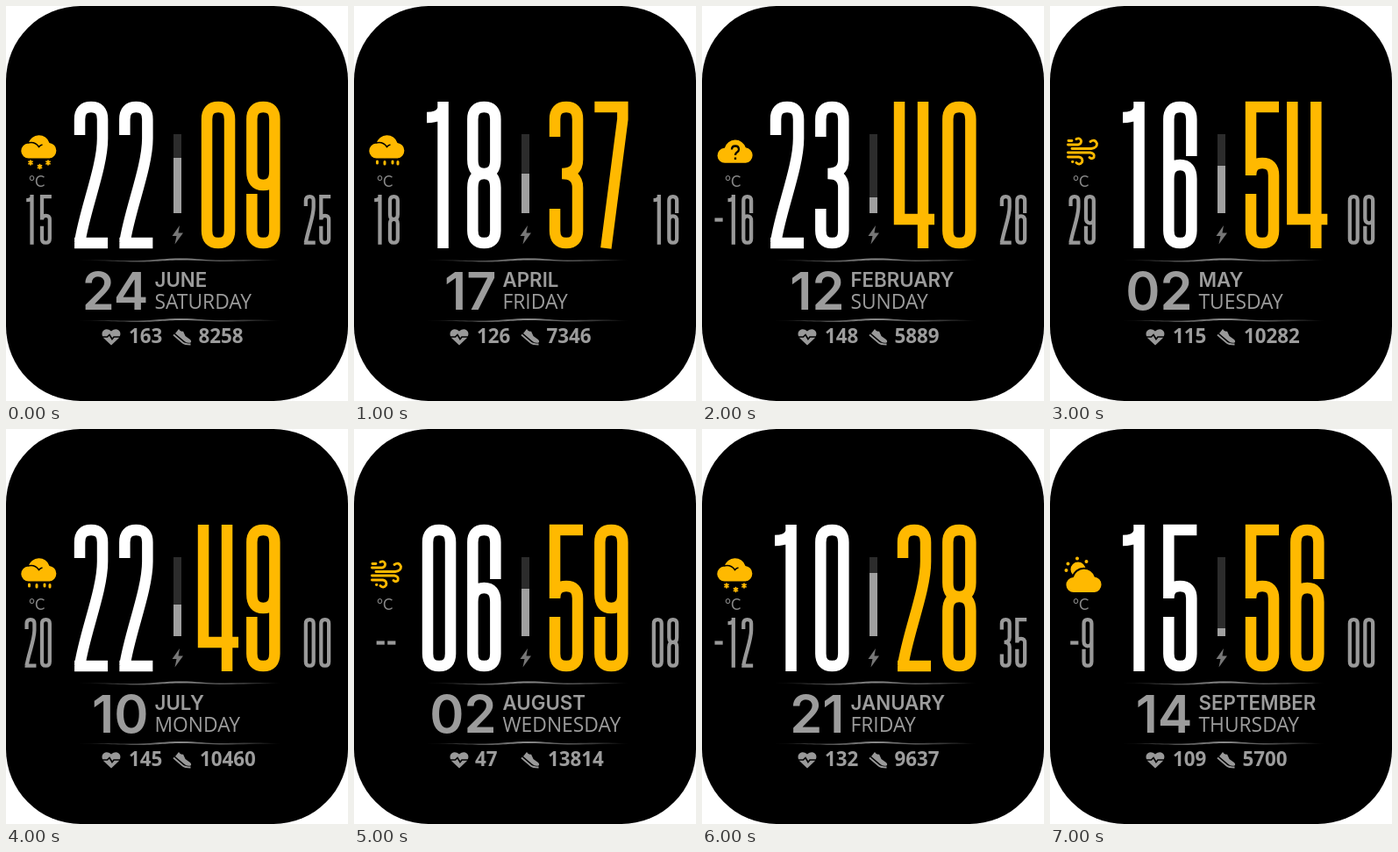
Recreate the animation shown at these times as an HTML page. Size 390x450 px, loop 8 s.

```html
<!DOCTYPE html>
<html lang="en">
<head>
<meta charset="utf-8">
<title>Watch face</title>
<style>
html, body { margin: 0; width: 100%; height: 100%; overflow: hidden; background: #fff; }
svg { display: block; }
text { fill: #9c9c9c; font: 22.8px "Open Sans", sans-serif; }
.month { font: 600 22.3px Inter, sans-serif; }
.num { font-weight: 700; font-size: 22.4px; }
.date { font: 600 59.5px Inter, sans-serif; text-anchor: end; }
.unit { font: 17px Lato, sans-serif; fill: #888; }
.digits path { fill: none; stroke-width: 12.5; }
</style>
</head>
<body>
<svg width="390" height="450" viewBox="0 0 390 450">
  <defs>
    <linearGradient id="fade">
      <stop offset="0" stop-color="#888" stop-opacity=".1"/>
      <stop offset=".5" stop-color="#888"/>
      <stop offset="1" stop-color="#888" stop-opacity=".1"/>
    </linearGradient>
    <path id="wave" fill="url(#fade)" d="M83 290C115 288.500 130 290.500 150 290S180 287.500 200 287.500S230 290 250 289.500S285 288.500 313 290C285 290 268 291 250 291S220 289.500 200 289.500S172 291.500 150 291.500S115 290 83 290Z"/>
  </defs>
  <rect width="390" height="450" rx="85"/>
  <path fill="#777" d="M198 250L189.500 262H194.500L192.500 271.500L202 258.500H196.500Z"/>
  <use href="#wave"/>
  <use href="#wave" y="68.500"/>
  <path fill="#999" d="M120 386.500L111.500 378.500C106 372 113 364.500 120 370.500C127 364.500 134 372 128.500 378.500Z"/>
  <path fill="none" stroke="#000" stroke-width="1.700" d="M108 377H115.500L118 374.500L121 379.500L123 377H132"/>
  <path fill="#999" d="M193 373L197 368Q199 371.500 202 370.500L204.500 376L210 380Q212 382 210.500 383.500Q206 384.500 203 381.500Z"/>
  <path fill="none" stroke="#999" stroke-width="1.800" d="M191 374.500L201.500 383.500Q204 385.500 210.500 385.500"/>
  <g id="live"></g>
</svg>
<script>
const YELLOW = '#ffb900', GREY = '#999';

// Digit centre lines in a box 167 high, centred on x = 0.
const LOOP = 'Q-13 6 0 6T13 20', BOWL = 'V147Q13 161 0 161T-13 147';
const GLYPHS = {
  0: `M-13 20${LOOP}${BOWL}Z`,
  1: 'M4.500 0V167M-14 18Q2 18 4.500 8',
  2: `M-13 38V20${LOOP}V42C13 75 -8 125 -13 161M-19 161H19`,
  3: `M-13 40V20${LOOP}V66Q13 82 -5 82Q13 82 13 98${BOWL}V122`,
  4: 'M-17 0V134H23M10 0V167',
  5: `M19 6H-13V84Q-13 70 0 70T13 84${BOWL}V105`,
  6: 'M13 62V20Q13 6 0 6T-13 20V147Q-13 161 0 161T13 147V88Q13 72 0 72T-13 88',
  7: 'M-19 6H13V20L-6 167',
  8: `M-13 20${LOOP}V66Q13 82 0 82T-13 66ZM-13 98Q-13 82 0 82T13 98${BOWL}Z`,
  9: 'M-13 105V147Q-13 161 0 161T13 147V20Q13 6 0 6T-13 20V79Q-13 95 0 95T13 79',
  '-': 'M-14 84H13'
};

function digits(text, center, top, scale, color) {
  const advance = c => c === '-' ? 37 : 51.3;
  let x = -[...text].reduce((sum, c) => sum + advance(c), 0) / 2;
  const paths = [...text].map(c => {
    const half = advance(c) / 2;
    x += 2 * half;
    return `<path d="${GLYPHS[c]}" transform="translate(${x - half})"/>`;
  });
  return `<g class="digits" stroke="${color}" transform="translate(${center} ${top}) scale(${scale})">${paths.join('')}</g>`;
}

const cloud = (dx, dy) => `<path transform="translate(${dx} ${dy})" fill="${YELLOW}"
  d="M26 173.500A8.500 8.500 0 0 1 25.500 156.500A12.500 12.500 0 0 1 49.500 156A8.800 8.800 0 0 1 49.500 173.500Z"/>`;
const curl = '<path d="M25 156Q33 154 37.500 160.500Q39 158.500 41.500 158" fill="none" stroke="#000" stroke-width="1.600"/>';
const strokes = (d, width) =>
  `<path d="${d}" fill="none" stroke="${YELLOW}" stroke-width="${width}" stroke-linecap="round"/>`;
const star = (x, y) => strokes(`M${x} ${y - 2.3}v4.600M${x - 2} ${y - 1.2}l4 2.400M${x - 2} ${y + 1.2}l4 -2.400`, 1.8);

const ICONS = {
  snow: cloud(0, 0) + curl + star(28, 178.5) + star(38.5, 183) + star(48, 178.5),
  rain: cloud(0, 0) + curl + strokes('M26.500 177v2M35 177.500v2.500M44 177v2M50 177.500v2.500', 3),
  unknown: cloud(0.3, 5.3) +
    '<path d="M34 163.500Q34 159.500 38 159.500T42 163.500Q42 165.500 39.500 167Q38 168 38 170M38 172.500V175" fill="none" stroke="#000" stroke-width="2.300"/>',
  wind: strokes('M20.500 158H32Q36 157 35.500 153.500Q34 149.500 30 151.500M25 162.500H47Q54 161.500 53.500 156.500Q51 151 46 154.500' +
    'M20.500 167H46Q51.500 168 50 172.500Q47.500 175 45 172.500M20.500 172H33Q38 173 36.500 178Q33.500 182 30 178.500M21 153.500H25M25.500 177.500H26', 2.9),
  sun: strokes('M18.500 161h.01M20.500 153.500h.01M31 147.500h.01M41.500 151h.01', 4) +
    `<circle cx="32" cy="160" r="8.500" fill="${YELLOW}"/>` +
    `<g stroke="#000" stroke-width="4" style="paint-order:stroke">${cloud(1.2, 12.5)}</g>`
};

const FIELDS = ['hour', 'minute', 'second', 'icon', 'temp', 'battery', 'date', 'month', 'day', 'pulse', 'steps'];
const STATES = [
  '22 09 25 snow 15 70 24 JUNE SATURDAY 163 8258',
  '18 37 16 rain 18 50 17 APRIL FRIDAY 126 7346',
  '23 40 26 unknown -16 20 12 FEBRUARY SUNDAY 148 5889',
  '16 54 09 wind 29 60 02 MAY TUESDAY 115 10282',
  '22 49 00 rain 20 40 10 JULY MONDAY 145 10460',
  '06 59 08 wind -- 60 02 AUGUST WEDNESDAY 47 13814',
  '10 28 35 snow -12 80 21 JANUARY FRIDAY 132 9637',
  '15 56 00 sun -9 10 14 SEPTEMBER THURSDAY 109 5700'
].map(line => Object.fromEntries(line.split(' ').map((value, i) => [FIELDS[i], value])));

const label = (x, y, text, style = '') => `<text x="${x}" y="${y}" class="${style}">${text}</text>`;

function draw(s) {
  const level = s.battery * 0.9;
  return digits(s.hour, 122.7, 109, 1, '#fff') +
    digits(s.minute, 267.7, 109, 1, YELLOW) +
    digits(s.second, 355, 215, 0.34, GREY) +
    digits(s.temp, 36.7, 215, 0.34, GREY) +
    ICONS[s.icon] +
    label(26, 206, '°C', 'unit') +
    '<rect x="191" y="146" width="9" height="90" fill="#2c2c2c"/>' +
    `<rect x="191" y="${236 - level}" width="9" height="${level}" fill="#a0a0a0"/>` +
    label(162.5, 345.5, s.date, 'date') +
    label(169.5, 320, s.month, 'month') +
    label(169.5, 345, s.day) +
    label(s.pulse.length < 3 ? 138 : 140, 384, s.pulse, 'num') +
    label(s.steps.length > 4 ? 221 : 219.5, 384, s.steps, 'num');
}

const live = document.getElementById('live');
const start = performance.now();
let shown = -1;
function tick() {
  const index = Math.floor((performance.now() - start) / 1000) % STATES.length;
  if (index !== shown) live.innerHTML = draw(STATES[shown = index]);
  requestAnimationFrame(tick);
}
tick();
</script>
</body>
</html>
```
